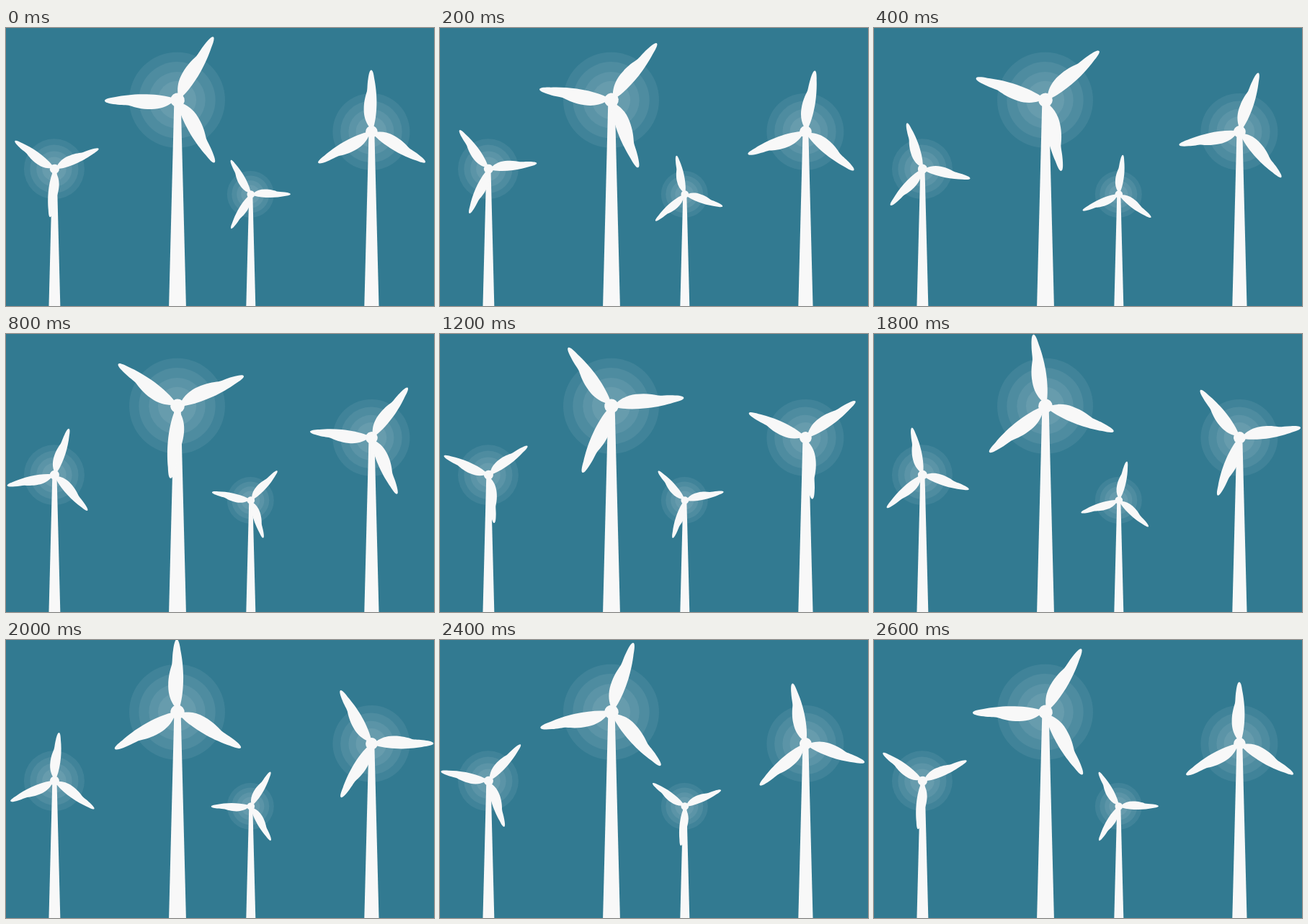
These frames come from a looping animation (594 px wide and 387 px high, 2800 ms). An HTML page:

```html
<!DOCTYPE html>
<html lang="en">
<head>
<meta charset="utf-8">
<title>Wind turbines</title>
<style>
  html, body { margin: 0; width: 100%; height: 100%; overflow: hidden; background: #327a91; }
  svg { display: block; width: 100vw; height: 100vh; }
</style>
</head>
<body>
<svg id="stage" viewBox="0 0 594 387" xmlns="http://www.w3.org/2000/svg">
  <defs>
    <path id="blade" d="M-4-8C-9-15-12.5-24-12.5-36C-12.5-50-9.5-59-7.3-66C-6.3-70-6.7-78-5.3-86C-4-95-2.5-101 0-101C2.5-101 4-94 5-86C7-76 8.5-62 8.5-50C8.5-35 7-20 3.5-8Z"/>
    <g id="rotor">
      <circle r="9.8"/>
      <use href="#blade"/>
      <use href="#blade" transform="rotate(120)"/>
      <use href="#blade" transform="rotate(240)"/>
    </g>
  </defs>
  <rect width="594" height="387" fill="#327a91"/>
</svg>
<script>
const NS = 'http://www.w3.org/2000/svg';
const stage = document.getElementById('stage');
const STEP = 200, STEPS = 14, FLOOR = 387;

// x, y: hub; size: blade scale; glow: halo radius; start: angle; turn: degrees per step
const turbines = [
  { x: 67.4, y: 196.2, size: 0.667, glow: 42, start: 65.3, turn: 18 },
  { x: 238, y: 100.3, size: 1, glow: 66.5, start: 29.5, turn: 9 },
  { x: 339.8, y: 231.5, size: 0.545, glow: 32.5, start: 89.8, turn: 18 },
  { x: 507.4, y: 144.4, size: 0.85, glow: 53.5, start: -0.3, turn: 9 }
];

function add(name, attrs, parent = stage) {
  const el = document.createElementNS(NS, name);
  for (const key in attrs) el.setAttribute(key, attrs[key]);
  parent.appendChild(el);
  return el;
}

function build(t) {
  for (const k of [1, 0.8, 0.59, 0.4]) {
    add('circle', { cx: t.x - 0.5, cy: t.y, r: t.glow * k, fill: '#fff', 'fill-opacity': 0.07 });
  }
  const g = add('g', { fill: '#f8f8f8' });
  const top = t.y + 8 * t.size, a = 4.8 * t.size, b = 11.9 * t.size;
  add('path', { d: `M${t.x - a} ${top}H${t.x + a}L${t.x + b} ${FLOOR}H${t.x - b}Z` }, g);
  t.rotor = add('use', { href: '#rotor' }, g);
}

function draw(ms) {
  // the last step shows the opening pose again
  const n = Math.floor(ms / STEP) % STEPS % (STEPS - 1);
  for (const t of turbines) {
    const angle = t.start + t.turn * n;
    t.rotor.setAttribute('transform', `translate(${t.x} ${t.y}) scale(${t.size}) rotate(${angle})`);
  }
}

function tick() {
  draw(performance.now());
  requestAnimationFrame(tick);
}

turbines.forEach(build);
tick();
</script>
</body>
</html>
```
